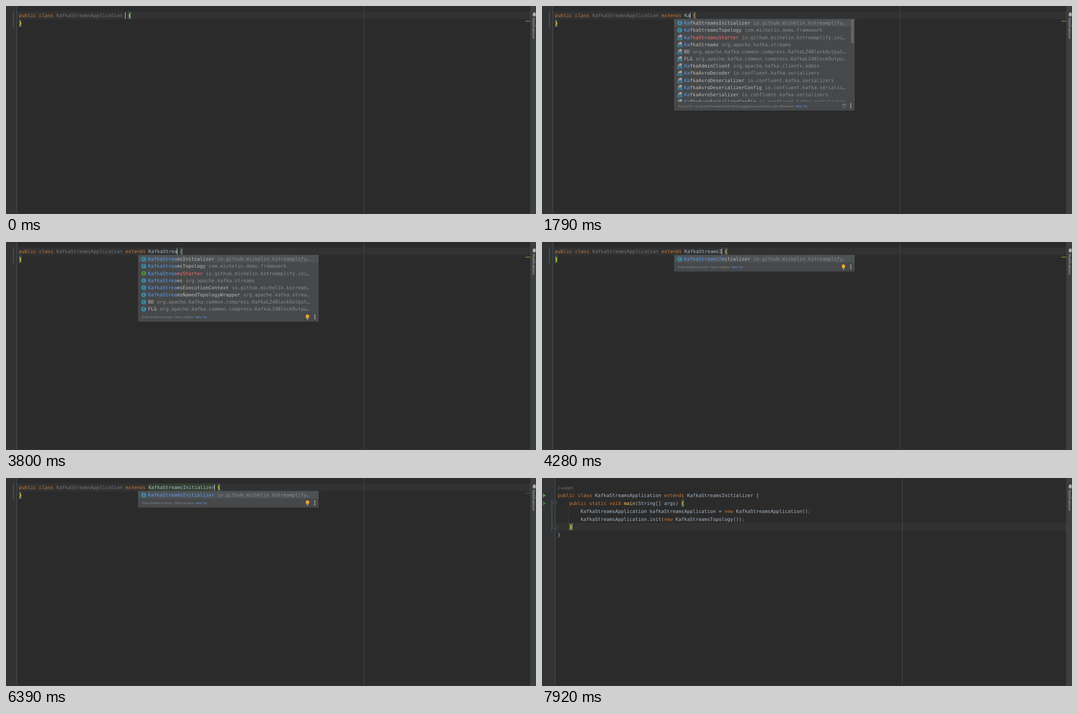
Animation of 1192 by 470 pixels, one loop 8 s. Source, as an HTML page:

```html
<!DOCTYPE html>
<html lang="en">
<head>
<meta charset="utf-8">
<title>Code completion</title>
<style>
html, body { margin: 0; width: 100%; height: 100%; overflow: hidden; background: #2b2b2b; }
svg { display: block; width: 1192px; height: 470px; }
text { white-space: pre; text-rendering: geometricPrecision; }
.code { font: 10.75px "DejaVu Sans Mono", monospace; fill: #a9b7c6; }
.ui { font: 6.75px "Noto Sans", sans-serif; fill: #8c8c8c; }
.key { fill: #cc7832; }
.dim { fill: #72737a; }
.fn { fill: #ffc66d; }
.hit { fill: #589df6; }
.bad { fill: #ff6b68; }
.pkg { fill: #8c8c8c; }
.brace { fill: #ffef28; font-weight: bold; }
</style>
</head>
<body>
<svg id="stage" viewBox="0 0 1192 470"></svg>
<script>
const LOOP = 8000, CW = 6.472, LINE = 17.8, ROW = 16.18;
const stage = document.getElementById('stage');

// Typing: one key time per character
const TYPED = 'extends KafkaStreamsInitializer';
const KEYS = [70, 200, 400, 600, 730, 930, 1130, 1260,
  1460, 1590, 2280, 2470, 2660, 2870, 3140, 3330, 3470, 3800, 3930, 4000,
  4280, 4480, 4680, 4810, 4940, 5270, 5730, 5930, 6060, 6190, 6390];
const T = { word: 330, wordEnd: 1260, list: 1660, icons: 2210, tip: 2280, icons2: 3070,
  resolved: 6390, newline: 6590, paste: 7450, run: 7780, usages: 7920 };

// Suggestions: name, package, interface flag
const LZ4 = 'org.apache.kafka.common.compress.KafkaLZ4Block';
const INIT = ['KafkaStreamsInitializer', 'io.github.michelin.kstreamplify…'];
const TOPO = ['KafkaStreamsTopology', 'com.michelin.demo.framework'];
const START = ['KafkaStreamsStarter', 'io.github.michelin.kstreamplify.ini…', 1];
const STREAMS = ['KafkaStreams', 'org.apache.kafka.streams'];
const BD = ['BD', LZ4 + 'Output…'], FLG = ['FLG', LZ4 + 'Outpu…'];
const SER = 'io.confluent.kafka.serializers';
const AVRO = ['KafkaAvroSerializer', SER], AVROCONF = ['KafkaAvroSerializerConfig', SER];
const BROAD = [INIT, TOPO, START, STREAMS, BD, FLG,
  ['KafkaAdminClient', 'org.apache.kafka.clients.admin'],
  ['KafkaAvroDecoder', SER], ['KafkaAvroDeserializer', SER],
  ['KafkaAvroDeserializerConfig', 'io.confluent.kafka.serializ…'], AVRO, AVROCONF];
const NARROW = [INIT, TOPO, START, STREAMS,
  ['KafkaStreamsExecutionContext', 'io.github.michelin.kstream…'],
  ['KafkaStorageException', 'org.apache.kafka.common.errors'],
  ['KafkaStreamsNamedTopologyWrapper', 'org.apache.kafka.strea…'],
  AVRO, AVROCONF,
  ['KafkaClientSupplier', 'org.apache.kafka.streams', 1],
  ['KafkaPrincipalSerde', 'org.apache.kafka.common.security.au…', 1], BD, FLG];

const rect = (x, y, w, h, fill, extra = '') =>
  `<rect x="${x}" y="${y}" width="${w}" height="${h}" fill="${fill}" ${extra}/>`;
const text = (x, y, body, cls = 'code', extra = '') =>
  `<text x="${x}" y="${y}" class="${cls}" ${extra}>${body}</text>`;
const span = (cls, s, extra = '') => `<tspan class="${cls}" ${extra}>${s}</tspan>`;
const key = s => span('key', s);
const path = (d, fill, extra = '') => `<path d="${d}" fill="${fill}" ${extra}/>`;

// Camel-hump matching: indexes of matched letters, or null
function match(name, typed) {
  const hits = [];
  let i = 0;
  for (const c of typed) {
    if (name[i] !== c) {
      i = /[A-Z]/.test(c) ? name.indexOf(c, i) : -1;
      if (i < 0) return null;
    }
    hits.push(i++);
  }
  return hits;
}

const matches = ([name], typed) =>
  match(name === 'BD' || name === 'FLG' ? 'KafkaLZ4BlockOutputStream' : name, typed);

function paint(name, typed, cls) {
  const hits = match(name, typed) || [];
  return [...name].map((c, i) => [c, hits.includes(i) ? 'hit' : cls])
    .reduce((runs, [c, k]) => {
      const last = runs[runs.length - 1];
      if (last && last[1] === k) last[0] += c; else runs.push([c, k]);
      return runs;
    }, []).map(([s, k]) => span(k, s)).join('');
}

function badge(y, iface) {
  return `<circle cx="309.8" cy="${y}" r="5.6" fill="${iface ? '#4f8a3c' : '#3e87a3'}"/>` +
    text(309.8, y + 2.7, iface ? 'I' : 'C', 'code',
      'text-anchor="middle" style="font-size:7.5px;fill:#263238"');
}

function binary(y) {
  return path(`M306 ${y}V${y - 3}L309 ${y - 6}H314.5V${y}Z`, '#9da0a2') +
    path(`M307 ${y - 3.2}H309.6V${y - 5.6}`, 'none', 'stroke="#46484a" stroke-width=".8"') +
    rect(304.5, y + .6, 11, 5.6, '#3e87a3') +
    text(310, y + 5.5, '01', 'code', 'text-anchor="middle" style="font-size:5.5px;fill:#1f2b31"');
}

function spinner(x, y, step) {
  let s = '';
  for (let i = 0; i < 8; i++) {
    s += `<path d="M0 -2.6V-5" stroke="#c4c6c8" stroke-width="1.2" opacity="${.3 + .1 * ((i + 8 - step) % 8)}" transform="translate(${x} ${y}) rotate(${i * 45})"/>`;
  }
  return s;
}

function footer(x, right, y, longTip, busy) {
  const tip = longTip
    ? 'Press Ctrl+. to choose the selected (or first) suggestion and insert a dot afterwards'
    : 'Press Entrée to insert, Tab to replace';
  const bx = right - 25;
  let s = text(x + 9, y + 2.6, tip + span('hit', 'Next Tip', 'dx="4"'), 'ui');
  s += busy >= 0 ? spinner(bx + 2, y - .5, busy) :
    `<circle cx="${bx}" cy="${y - 1.6}" r="4.2" fill="#e3a23a"/>` +
    rect(bx - 2, y + 1, 4, 2.6, '#e3a23a') + rect(bx - 2, y + 4.3, 4, 1.2, '#a9abad');
  for (const d of [-4, 0, 4]) s += `<circle cx="${right - 8.5}" cy="${y + d - .3}" r="1.3" fill="#c4c6c8"/>`;
  return s;
}

function frame(x, right, bottom) {
  return rect(x, 29.5, right - x, bottom - 29.5, '#46484a') +
    rect(x, 30, right - x, 16.5, '#4e5254') +
    rect(x + .25, 29.75, right - x - .5, bottom - 30, 'none', 'stroke="#55585a" stroke-width=".5"');
}

function wordPopup(word) {
  return frame(262, 628, 66.5) +
    text(268.4, 42.2, paint('extends', word, ''), 'code', 'style="fill:#bbb;font-weight:bold"') +
    footer(262, 628, 56, false, -1);
}

function listPopup(t, word) {
  const pool = word.length < 6 ? BROAD : NARROW;
  const rows = pool.filter(r => pool === BROAD || matches(r, word)).slice(0, 12);
  const full = rows.length > 11;
  const bottom = full ? 236 : 66.3 + (rows.length - 1) * ROW;
  const busy = t < T.icons2 && full;
  const known = t < T.icons ? 2 : word.length === 6 && busy ? 4 : 12;
  let list = '';
  rows.forEach(([name, pkg, iface], i) => {
    const y = 38.5 + i * ROW;
    list += i < known ? badge(y, iface) : binary(y);
    list += text(319.6, y + 3.7, paint(name, word, iface ? 'bad' : '') + span('pkg', pkg, 'dx="7"'),
      'code', 'style="fill:#bbb"');
  });
  let s = frame(297.5, 703, bottom) + `<g clip-path="url(#list)">${list}</g>`;
  if (full) s += rect(695, 30, 6, pool === BROAD ? 54 : 163.5, '#636567');
  return s + footer(297.5, 703, bottom - 10, t < T.tip, busy ? Math.floor(t / 67) % 8 : -1);
}

function shell(shift, caretY) {
  const edge = 24 + shift;
  return '<defs><clipPath id="list"><rect x="297" y="30" width="397" height="186"/></clipPath></defs>' +
    rect(0, 0, 1192, 470, '#2b2b2b') + rect(0, 0, edge, 470, '#313335') +
    rect(edge, caretY - 9.3, 1179 - edge, LINE, '#323232') +
    rect(edge, 0, 1, 468, '#555') + rect(805 + shift, 0, 1, 468, '#4b4b4b') +
    rect(1179, 0, 13, 470, '#3c3f41') + rect(0, 468, 1179, 2, '#323334') +
    path('M1183.5 22L1185 20V17A3.2 3.2 0 0 1 1191.2 17V20L1192 22ZM1186.5 22.6H1190V24H1186.5Z', '#afb1b3') +
    text(0, 0, 'Notifications', 'ui', 'transform="translate(1183.6 27) rotate(90)" style="font-size:7.9px;fill:#bbb"');
}

const caret = (x, y) => rect(x, y - 7.5, 1.2, 14.5, '#d0d0d0');
const brace = (x, y, c, fill = '#ffef28') =>
  rect(x - .3, y - 9, CW + .3, 17.3, '#3b514d') + text(x, y + 3.6, c, 'code brace', `style="fill:${fill}"`);

function typing(t) {
  const n = KEYS.filter(k => k <= t).length, typed = TYPED.slice(0, n);
  const open = t < T.newline, x = 29, y = 21.7;
  const at = x + (37 + n) * CW, name = typed.slice(8);
  let s = shell(0, open ? y : y + LINE);
  s += rect(16, 12.5, 1.3, LINE * (open ? 2 : 3), '#4a626f');
  s += rect(1168, 33.5, 11, open ? 1.6 : 3, t < T.resolved ? '#a38a2b' : '#1d7a2c');
  if (t >= T.resolved && open) s += rect(x + 45 * CW, 12.8, 23 * CW, 17.2, '#344134');
  s += text(x, y + 3.6, key('public class ') + span('dim', 'KafkaStreamsApplication ') +
    key(typed.slice(0, 8)) + name + (open ? '' : ' {'));
  if (open) {
    const tint = name.length < 2 || t >= T.resolved ? '#ffef28' : name.length < 12 ? '#d9874a' : '#f0b93a';
    s += brace(at + CW, y, '{', tint) + brace(x, y + LINE, '}') + caret(at - .6, y);
  } else {
    s += text(x, y + 2 * LINE + 3.6, '}') + caret(x + 4 * CW, y + LINE);
  }
  if (t >= T.word && t < T.wordEnd) s += wordPopup(typed);
  if (t >= T.list && open) s += listPopup(t, name);
  return s;
}

const fold = (y, d) => path(`M26.5 ${y - 4 * d}H33V${y + d}L29.75 ${y + 4.5 * d}L26.5 ${y + d}Z`,
  '#2b2b2b', 'stroke="#606366" stroke-width=".9"') + rect(28, y - d - .4, 3.5, .8, '#606366');
const play = (y, fill) => path(`M2 ${y - 4.7}L8.8 ${y}L2 ${y + 4.7}Z`, fill);

function pasted(t) {
  const x = 35, top = t < T.usages ? 21.7 : 21.7 + LINE;
  const y = i => top + i * LINE;
  const app = 'KafkaStreamsApplication', v = 'kafkaStreamsApplication';
  const lines = [
    key('public class ') + (t < T.run ? span('dim', app) : app) + key(' extends ') + 'KafkaStreamsInitializer {',
    '    ' + key('public static void ') + span('fn', 'main') + '(String[] args) ',
    `        ${app} ${v} = ${key('new ')}${app}()${key(';')}`,
    `        ${v}.init(${key('new ')}KafkaStreamsTopology())${key(';')}`,
    '', '}'];
  let s = shell(5, y(4));
  s += rect(21.7, y(1) - 9.3, 1.3, 4 * LINE, '#4d6458');
  s += rect(60, y(2) - 9, 1, 2 * LINE, '#3a3a3a');
  s += fold(y(1) + .6, 1) + fold(y(4) - .3, -1);
  if (t < T.run) s += rect(1168, 33.5, 11, 3, '#1d7a2c');
  else s += play(y(0), '#499c54') + play(y(1), '#42774a');
  if (t >= T.usages) s += text(x, 25, '2 usages', 'ui', 'style="font-size:8.7px;fill:#787878"');
  lines.forEach((l, i) => { s += text(x, y(i) + 3.6, l); });
  s += brace(x + 43 * CW, y(1), '{', '#f2cf3c') + brace(x + 4 * CW, y(4), '}');
  return s + caret(x + 5 * CW - .4, y(4));
}

let shown = '';
const begin = performance.now();
function draw(now) {
  const t = Math.max(0, now - begin) % LOOP;
  const next = t < T.paste ? typing(t) : pasted(t);
  if (next !== shown) stage.innerHTML = shown = next;
  requestAnimationFrame(draw);
}
draw(begin);
</script>
</body>
</html>
```
